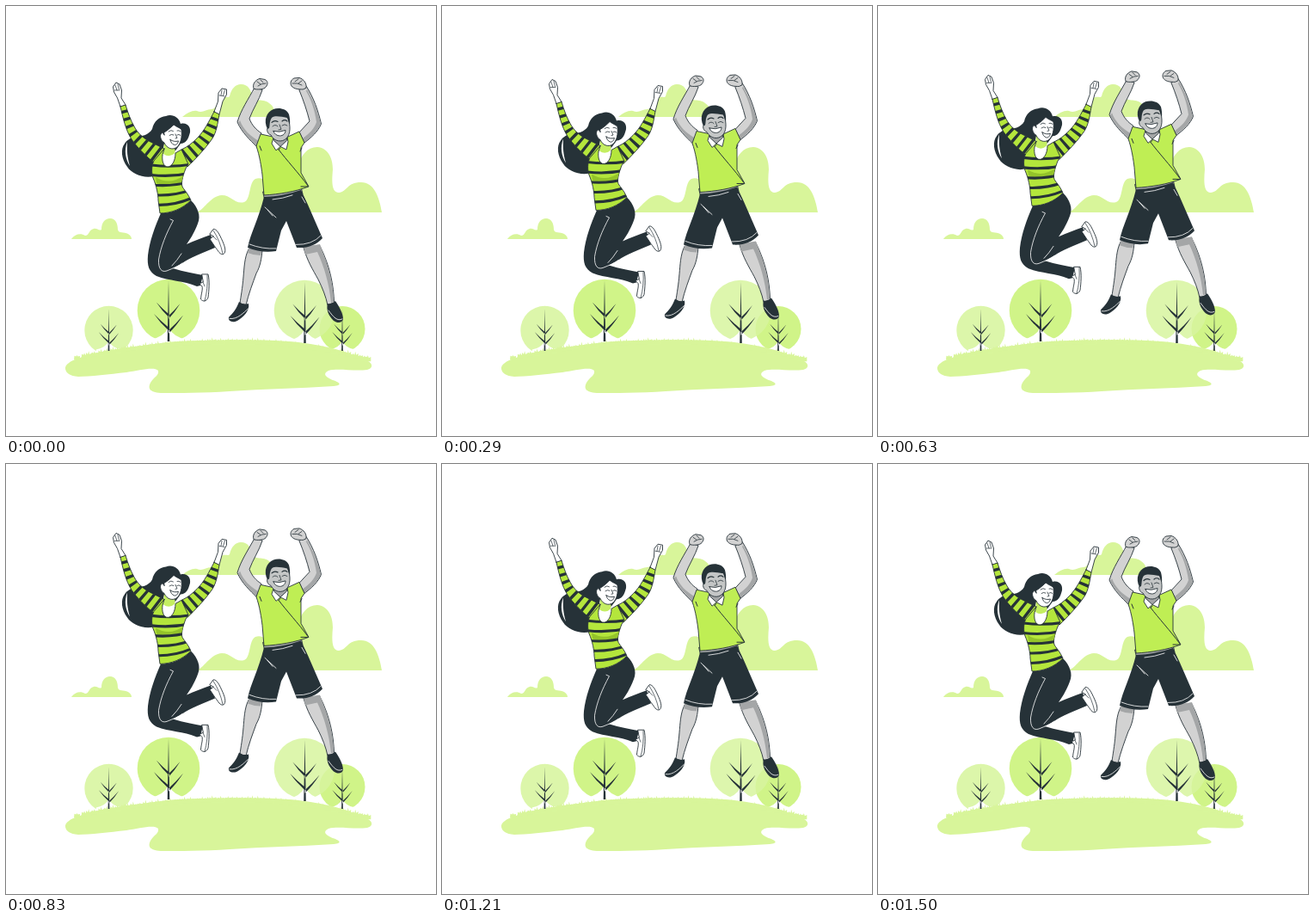
Animation of 500x500 px, one loop 1.54 s. Source, as an HTML page:

```html
<!DOCTYPE html>
<html lang="en">
<head>
<meta charset="utf-8">
<title>Jumping for joy</title>
<style>
  html, body { margin: 0; width: 100%; height: 100%; overflow: hidden; background: #fff; }
  svg { display: block; width: 100%; height: 100%; }
  svg * { stroke-linecap: round; }
  .line { fill: none; stroke: #263238; }
  .ink { fill: #263238; }
  .edge { stroke: #263238; stroke-width: .9; stroke-linejoin: round; }
  .chalk { fill: none; stroke: #fff; stroke-width: .8; }
  .white { fill: #fff; }
  .lime { fill: #bfee54; }
  .leaf { fill: #b4e63c; }
  .skin { fill: #d2d2d2; }
  .shade { fill: #a4a6a7; }
  .pale { fill: #d8f59a; }
  .band { stroke-linecap: butt; }
</style>
</head>
<body>
<svg viewBox="0 0 500 500">
  <defs>
    <path id="sleeveL" d="M133 117L139 115C142 125 145 133 149 140C153 148 160 154 168 158L184 166L173 183C163 175 152 164 146 155C139 144 136 130 133 117Z"/>
    <path id="sleeveR" d="M242 123L248 126C246 137 245 146 240 154C231 167 220 178 211 187L204 167C211 164 217 159 222 154C231 145 236 134 242 123Z"/>
    <path id="top" d="M184 166L172 180C169 186 169 194 171 200C175 209 177 220 177 226L179 241C192 241 205 236 215 226C211 217 207 214 205 210C203 205 207 194 209 189L212 184L204 167L197 171C197 180 193 187 188 187C183 187 181 180 182 173Z"/>
    <clipPath id="clipL"><use href="#sleeveL"/></clipPath>
    <clipPath id="clipR"><use href="#sleeveR"/></clipPath>
    <clipPath id="clipTop"><use href="#top"/></clipPath>
  </defs>

  <g class="pale">
    <path d="M76 271C80 265 87 264 92 267C97 267 96 260 102 259C106 258 108 262 111 260C111 252 115 247 121 247C128 247 130 254 130 260C131 265 137 262 142 265C145 267 146 269 146 271Z"/>
    <path d="M205 129C211 124 217 121 222 122C229 125 232 120 239 120C247 119 246 107 253 106C257 105 258 107 260 105C262 96 267 91 273 91C282 91 285 98 286 105C288 112 300 107 306 113C313 117 311 124 315 129Z"/>
    <path d="M222 240C232 235 238 221 251 220C262 220 266 231 277 228C285 225 282 205 290 201C299 198 303 206 310 206L338 190C343 173 350 164 362 164C374 165 380 176 380 190C379 202 378 217 387 217C397 216 396 205 413 205C428 205 434 222 437 240Z"/>
  </g>
  <g>
    <circle cx="119.5" cy="377" r="28.2" fill="#dcf6aa"/>
    <circle cx="189" cy="354" r="36.3" fill="#d0f488"/>
    <circle cx="391" cy="375.5" r="26.5" fill="#d0f488"/>
    <circle cx="347" cy="354" r="35.3" fill="#d8f59f" opacity=".85"/>
  </g>
  <path id="gaps" class="white"/>
  <path class="pale" d="M69 422C68 417 76 412 84 410C100 402 150 396 187 391C230 388 300 387 340 391C375 395 400 403 416 411C427 414 428 421 420 423C405 425 386 421 375 424C367 428 373 432 380 435C389 438 391 441 381 442C340 445 300 445 260 448C230 450 200 450 180 450C166 449 165 444 168 438C172 431 178 430 177 424C172 419 155 424 140 426C120 428 98 431 84 431C74 430 70 427 69 422Z"/>
  <path id="grass" class="pale"/>
  <path id="trees" class="ink"/>

  <g id="jump">
    <g id="woman">
      <path class="ink" d="M186 128C193 125 201 129 203 137C211 135 215 141 214 147C212 155 209 160 203 160L190 178L172 198C160 201 146 195 141 187C134 178 133 166 138 160C140 156 144 155 147 152C158 152 166 150 170 143C172 134 178 129 186 128Z"/>
      <path class="white" d="M141 158C137 168 139 178 144 186C141 176 140.500 168 141 158Z"/>
      <path class="white edge" d="M133 117L129.500 107L125.500 100L124.500 94L128 89L132 91L134.500 98L134 107L139 115Z"/>
      <path class="line" stroke-width=".7" d="M127 92L129 98M130 91L131.500 97M126.500 98L132 98"/>
      <path class="white edge" d="M242 123L246.500 111L247 101L251 96L256.500 97L256.500 103L252 111L248 126Z"/>
      <path class="line" stroke-width=".7" d="M251 98L250 104M254.500 98L252.500 104M248 104L254 105"/>

      <path class="white" d="M184 160L181 174C180 182 183 188 188 188C193 188 198 180 197 170L195 163Z"/>
      <path fill="#c4ee62" d="M184 159L183 172Q190 177 196.500 171L196 163Z"/>
      <path class="white edge" d="M184 147C188 145 193 140 195 138C199 141 203 142 204 144C205 153 203 160 199 164C194 168 187 166 184 159C180 157 178 150 181 148C182 147 183 148 184 150Z"/>
      <path class="line" stroke-width=".8" d="M189 146Q192 143.500 194.500 145.500M199 145Q201 144 203 146M190 150.500Q192 148.500 195 150M199 150Q201 148.500 203 150.500M197 149L199 153.500L197 154"/>
      <path class="white edge" d="M191 155.500C194 157.500 197 158 200.500 157C199.500 160.500 198 162 195.500 161.500C193 160.500 191.500 158.500 191 155.500Z"/>

      <path class="ink" d="M180 241C193 241 206 235 215 226C223 234 227 244 223 253C219 264 213 273 210 277C219 273 229 269 238 266L243 281C229 287 213 293 205 299L194 305C207 309 219 311 229 313L226 325L222 326C206 319 190 320 175 314C166 309 164 302 165 290C167 273 173 257 180 241Z"/>
      <path class="chalk" d="M191 248L194.500 249.500C186 265 180 280 177.500 295C177 306 181 310 187 308C194 305 201 303 205 299M193 302Q199 296 204 288"/>
      <path class="white edge" d="M237 265L241 259.500C245 259 248 265 252 274C255 281 256 286 253 288.500C249 290 247 285 243 280L237 271L241 268Z"/>
      <path class="line" stroke-width=".7" d="M241 261Q249 273 252 288M241 268L245 272"/>
      <path class="white edge" d="M228 312L235 312C237 320 236 331 235 339C233 344 229 344 226.500 341C227 334 229 330 228 326L225 323L229 321Z"/>
      <path class="line" stroke-width=".7" d="M234 313Q235 329 231 343M229 321L231 326"/>

      <use href="#sleeveL" class="leaf edge"/>
      <path class="line band" clip-path="url(#clipL)" stroke-width="30" stroke-dasharray="3.4 5.8" stroke-dashoffset="-5" d="M136 116C141 134 143 146 153 155C162 164 171 170 181 178"/>
      <use href="#sleeveR" class="leaf edge"/>
      <path class="line band" clip-path="url(#clipR)" stroke-width="30" stroke-dasharray="3.4 5.8" stroke-dashoffset="-6" d="M245 124C240 138 237 149 226 161C220 168 213 173 206 179"/>
      <use href="#top" class="leaf edge"/>
      <path fill="#94c42a" clip-path="url(#clipTop)" d="M174 199Q190 209 207 197L204 205Q188 211 175 206Z"/>
      <path id="stripes" class="line" clip-path="url(#clipTop)" stroke-width="3.1"/>
    </g>

    <g id="man">
      <path class="skin edge" d="M282 283C277 293 277 305 276 315C275 328 273 338 272 346L279 348C282 335 287 322 291 311C296 302 297 294 298 284Z"/>
      <path class="shade" d="M282 282L298 283L296 290Q288 290 281 287Z"/>
      <path class="skin edge" d="M346 281C350 296 357 307 363 318C368 328 372 338 374 348L381.500 345C381 325 377 303 365 279Z"/>
      <path class="shade" d="M346 280L365 277L369 288C376 306 381 326 381 344L378 345C376 324 370 303 362 286L348 289Z"/>
      <path class="ink" d="M271 344Q276 348 282 346C284 354 276 362 269 366C263 369 258 366 259 362C264 357 268 352 271 344Z"/>
      <path class="chalk" d="M260 363.500C269 365 277 356 281.500 352"/>
      <path class="ink" d="M374 346Q379 347 383 343C388 350 392 358 392 364C391 369 385 369 381 366C375 360 372 353 374 346Z"/>
      <path class="chalk" d="M375 354C381 362 385 367 391 364"/>

      <path class="shade edge" d="M299 216L343 210L345 219L301 225Z"/>
      <path class="ink" d="M300 222Q323 221 343 214L351 231L368 270C361 278 350 282 338 281L326 250L320 261L314 285C302 287 291 285 281 281C284 265 294 247 300 222Z"/>
      <path class="chalk" d="M283 277Q298 283 314 282M337 277.500Q356 278 366 267M301 234L314 246M304 237L310 244M310 225Q322 224 333 220M344 222L348 229"/>

      <path class="skin edge" d="M289 95C282 108 273 121 269 135C274 147 284 156 292 164L297 148C291 144 286 139 283 131C287 120 294 110 298 98Z"/>
      <path class="shade" d="M270 136C275 146 284 155 292 163L294 157C284 151 276 144 272 133Z"/>
      <path class="skin edge" d="M341 98C346 110 350 122 353 134L341 147L347 159C355 153 363 146 366.500 137C363 122 358 107 349 93Z"/>
      <path class="shade" d="M350 97C357 109 363 124 366 137C362 146 355 152 347 158L345 154C353 148 359 142 361 135C359 120 354 107 349 99Z"/>
      <path class="skin edge" d="M288 96C286 91 290 86 295 84.500L301 85.500C304 87 305 90 303 93C301 97 296 97 292 97Z"/>
      <path class="line" stroke-width=".8" d="M292 88L296 91M296 86L299 89M293 93Q297 90 302 90"/>
      <path class="skin edge" d="M349 95C350 90 346 85 341 83.500L335 84C331 86 330 90 332 93C335 97 341 97 345 97Z"/>
      <path class="line" stroke-width=".8" d="M344 87L340 90M340 85L336 88M344 92Q339 89 333 90"/>

      <path class="lime edge" d="M310 152L296 149L291 163C295 174 297 188 298 196L300 220C318 219 336 216 352 210L343 194V165L347 159L341 146L328 152Z"/>
      <path class="line" d="M317 167C326 179 340 194 351 209M317 167L319 165M344 165L342 169M297 168L295 163M343 210L351 210"/>
      <path class="shade" d="M311 151L327 151L326 160L319 164L312 159Z"/>
      <path class="white edge" stroke-width=".7" d="M311 153L309 160L314 168L319 163.500L312 157ZM327 152L328 158L326 167L319 163.500L326 157Z"/>
      <path class="edge" fill="#c4c6c6" d="M306 130C312 126 322 126 328 130C331 140 331 149 326 154C321 159 312 158 308 150C304 149 302 143 305 141Z"/>
      <path class="ink" d="M304 143C299 133 303 123 311 120C317 118 326 119 329 126C330 130 330.500 134 330 138L327 130C320 129 313 127 309 130C306 134 307 139 306 142Z"/>
      <path class="line" stroke-width="1.200" d="M309 135.500Q312 132.500 316 134.500M321 134Q324 131.500 327 134"/>
      <path class="line" stroke-width=".8" d="M310 140Q313 137 316 140M321 139Q324 136.500 327 139M318 138L320 143.500L317 144"/>
      <path class="white edge" d="M311 145.500Q318 147.500 325 144.500C325 148.500 322 151 318.500 151C315 151 312 149 311 145.500Z"/>
    </g>
  </g>
</svg>
<script>
  const LOOP = 1540, SWING = 1500, RISE = 9;
  const $ = id => document.getElementById(id);
  const setPath = (id, d) => $(id).setAttribute('d', d);

  // foot x, foot y, height
  const trees = [[119.5, 401, 49], [189, 390, 71], [347.5, 392, 71], [391, 401, 49]];
  // reach, start height, end height, as parts of the tree height
  const twigs = [[-.24, .2, .45], [.24, .15, .43], [-.2, .42, .64], [.19, .39, .62]];
  const place = (x, y, h) => (dx, k) => `${x + dx * h} ${y - k * h}`;

  function trunk(...tree) {
    const at = place(...tree);
    const twig = ([dx, from, to]) => {
      const mid = from + (to - from) * .38;
      return `M${at(0, from - .02)}Q${at(dx * .55, mid)} ${at(dx, to)}Q${at(dx * .5, mid + .03)} ${at(0, from + .03)}Z`;
    };
    return `M${at(0, 1)}L${at(.018, 0)}L${at(-.018, 0)}Z` + twigs.map(twig).join('');
  }
  function gap(...tree) {
    const at = place(...tree);
    return `M${at(-.3, .03)}Q${at(-.08, .07)} ${at(0, .23)}Q${at(.08, .07)} ${at(.3, .03)}L${at(.3, -.1)}L${at(-.3, -.1)}Z`;
  }
  setPath('trees', trees.map(t => trunk(...t)).join(''));
  setPath('gaps', trees.map(t => gap(...t)).join(''));

  const rim = x => 389 + 16 * ((x - 265) / (x < 265 ? 170 : 138)) ** 2;
  let seed = 7, grass = '';
  const rand = () => (seed = seed * 16807 % 2147483647) / 2147483647;
  for (let x = 82; x < 422; x += 4 + rand() * 5) {
    const y = rim(x), h = 1.5 + rand() * 3;
    grass += `M${x - 3} ${y + 4}L${x - 2.5} ${y - h * .5}L${x - .5} ${y}L${x + .5} ${y - h}L${x + 1.5} ${y}L${x + 4} ${y - h * .4}L${x + 4} ${y + 4}Z`;
  }
  setPath('grass', grass);

  let rows = '';
  for (let i = 0; i < 5; i++) {
    const y = 184.5 + i * 11.5;
    rows += `M165 ${y}Q193 ${y + 4} 220 ${y - 1 - i * 2}`;
  }
  setPath('stripes', rows);

  function draw(now) {
    const phase = 2 * Math.PI * (now + LOOP - SWING) / LOOP;
    const lift = RISE / 2 * (1 - Math.cos(phase));
    $('jump').setAttribute('transform', `translate(0 ${-lift.toFixed(3)})`);
  }
  const start = performance.now();
  function tick() {
    draw((performance.now() - start) % LOOP);
    requestAnimationFrame(tick);
  }
  tick();
</script>
</body>
</html>
```
